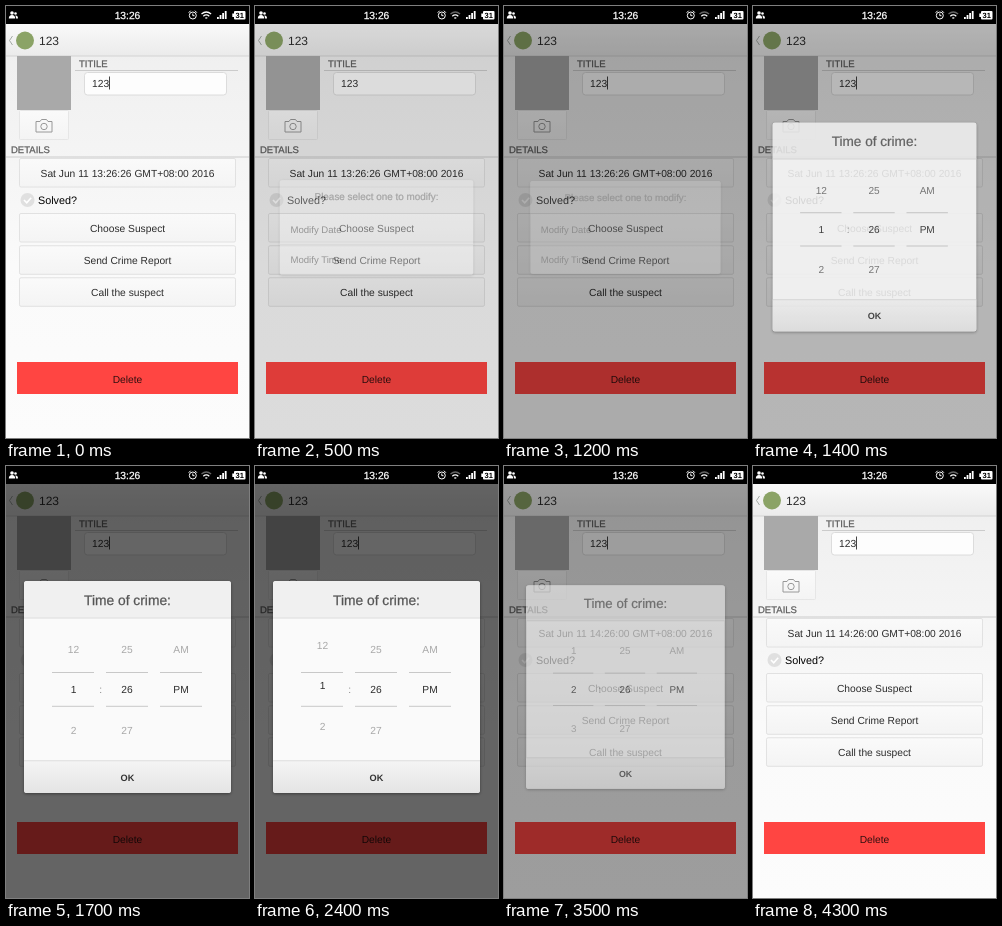
Write an HTML page that moves like this. It is 243x432 px and loops after 4500 ms.

```html
<!DOCTYPE html>
<html lang="en">
<head>
<meta charset="utf-8">
<title>Crime details</title>
<style>
  html, body { margin: 0; width: 100%; height: 100%; overflow: hidden; background: #f9f9f9; }
  svg { display: block; width: 100vw; height: 100vh; }
  text { font-family: "Liberation Sans", Arial, sans-serif; font-size: 10.25px; white-space: pre; text-rendering: geometricPrecision; }
  .mid { text-anchor: middle; }
  .medium { stroke: currentColor; stroke-width: .25px; }
  .section { font-size: 9.5px; fill: #5c5c5c; color: #5c5c5c; }
  #menu { transform-origin: 121.5px 221.5px; }
  #picker { transform-origin: 121.5px 221px; }
</style>
</head>
<body>
<svg viewBox="0 0 243 432" preserveAspectRatio="none">
  <defs>
    <linearGradient id="page" x2="0" y2="1"><stop stop-color="#ededed"/><stop offset=".6" stop-color="#fafafa"/><stop offset="1" stop-color="#fcfcfc"/></linearGradient>
    <linearGradient id="bar" x2="0" y2="1"><stop stop-color="#f9f9f9"/><stop offset="1" stop-color="#ebebeb"/></linearGradient>
    <linearGradient id="button" x2="0" y2="1"><stop stop-color="#fafafa"/><stop offset="1" stop-color="#f4f4f4"/></linearGradient>
    <linearGradient id="foot" x2="0" y2="1"><stop stop-color="#f4f4f4"/><stop offset="1" stop-color="#e4e4e4"/></linearGradient>
    <filter id="shadow" x="-10%" y="-10%" width="120%" height="125%"><feDropShadow dx="0" dy="1" stdDeviation="1.5" flood-opacity=".4"/></filter>
    <clipPath id="menuBox"><rect x="18" y="171" width="207" height="101" rx="3"/></clipPath>
    <clipPath id="pickerBox"><rect x="18" y="115" width="207" height="212" rx="3"/></clipPath>
    <clipPath id="centre"><rect x="40" y="207" width="165" height="33"/></clipPath>
    <clipPath id="sides"><path d="M40 162h165v45H40zM40 240h165v44H40z"/></clipPath>
  </defs>

  <rect width="243" height="432" fill="url(#page)"/>

  <!-- app bar -->
  <rect y="18" width="243" height="32" fill="url(#bar)"/>
  <path d="M0 50H243" stroke="#cccccc" stroke-width=".8"/>
  <path d="M6.5 30L3.5 34.5L6.5 39" fill="none" stroke="#a3aaa5"/>
  <circle cx="19" cy="34.5" r="9" fill="#8ba366"/>
  <text x="33" y="38.7" style="font-size:12px" fill="#2c2c2c">123</text>

  <!-- photo and title -->
  <rect x="11" y="50" width="54" height="54" fill="#a9a9a9"/>
  <rect x="13.5" y="104.5" width="49" height="29" rx="1" fill="url(#button)" stroke="#e2e2e2" stroke-width=".8"/>
  <g fill="none" stroke="#989898">
    <path d="M30 115.500h4l1.500-2h5l1.500 2h4v10.500h-16z"/>
    <circle cx="38" cy="120.500" r="3.200"/>
  </g>
  <text class="section medium" x="73" y="60.600">TITILE</text>
  <path d="M69 64.500H232M0 151H243" stroke="#cbcbcb"/>
  <rect x="78.500" y="66.500" width="142" height="22.500" rx="3" fill="#fdfdfd" stroke="#d8d8d8" stroke-width=".9"/>
  <text x="86" y="81" fill="#2c2c2c">123</text>
  <path id="cursor" d="M103.500 70.500V83.500" stroke="#444"/>
  <text class="section medium" x="5" y="147">DETAILS</text>

  <g id="buttons"></g>
  <circle cx="21.500" cy="194" r="7" fill="#e0e0e0"/>
  <path d="M18 194l2.700 2.800l4.500-5" fill="none" stroke="#fff" stroke-width="1.600"/>
  <text x="32" y="198" style="font-size:10.800px">Solved?</text>
  <rect x="11" y="356" width="221" height="32" fill="#ff4542"/>
  <text class="mid" x="121.500" y="376.500" fill="#321010">Delete</text>

  <rect id="dim" y="18" width="243" height="414" opacity="0"/>

  <g id="menu" opacity="0">
    <g filter="url(#shadow)"><g clip-path="url(#menuBox)">
      <rect x="18" y="171" width="207" height="101" fill="#fcfcfc"/>
      <rect x="18" y="171" width="207" height="35.500" fill="#f0f0f0"/>
      <rect id="row" x="18" y="240" width="207" height="32" fill="#dedede" opacity="0"/>
      <path d="M18 206.500H225M18 239.500H225" stroke="#dadada"/>
    </g></g>
    <text class="mid medium" x="121.500" y="192.500" style="font-size:10.600px" fill="#555" color="#555">Please select one to modify:</text>
    <text x="29.500" y="227.200" fill="#2c2c2c">Modify Date</text>
    <text x="29.500" y="260" fill="#2c2c2c">Modify Time</text>
  </g>

  <g id="picker" opacity="0">
    <g filter="url(#shadow)"><g clip-path="url(#pickerBox)">
      <rect x="18" y="115" width="207" height="212" fill="#fafafa"/>
      <rect x="18" y="115" width="207" height="37" fill="#f0f0f0"/>
      <rect x="18" y="295" width="207" height="32" fill="url(#foot)"/>
      <rect id="ok" x="18" y="295" width="207" height="32" fill="#d2d2d2" opacity="0"/>
      <path d="M18 152H225M18 294.800H225" stroke="#dcdcdc"/>
    </g></g>
    <text class="mid medium" x="121.500" y="138.700" style="font-size:13.800px" fill="#555" color="#555">Time of crime:</text>
    <path d="M46 206.500h42m12 0h42m12 0h42M46 240.300h42m12 0h42m12 0h42" stroke="#c8c8c8"/>
    <text class="mid" x="94.800" y="227" fill="#888">:</text>
    <g id="wheels"></g>
    <text class="mid" x="121.500" y="314.500" style="font-size:9.200px;font-weight:bold" fill="#333">OK</text>
  </g>

  <!-- status bar -->
  <rect width="243" height="18"/>
  <g fill="#fff" color="#fff">
    <circle cx="6" cy="7" r="1.800"/><path d="M2.800 12.500q0-3.500 3.200-3.500t3.200 3.500z"/>
    <circle cx="9.500" cy="7.500" r="1.300"/><path d="M10 12.500q0-2-.8-3q2.800-.3 2.800 3z"/>
    <text class="mid medium" x="121.500" y="12.800">13:26</text>
    <path d="M211 13v-2h1.800v2zM213.600 13v-4h1.800v4zM216.200 13v-6h1.800v6zM218.800 13v-8h1.800v8z"/>
    <rect x="228" y="5" width="11.500" height="8.500" rx="1"/><rect x="226.300" y="7.500" width="1.700" height="3.500"/>
  </g>
  <text class="mid" x="233.700" y="12" style="font-size:7.500px;font-weight:bold">31</text>
  <g fill="none" stroke="#fff">
    <circle cx="186.800" cy="9.500" r="3.500"/>
    <path d="M186.800 7.500v2.200h1.700M182.700 6.700l2-2M190.900 6.700l-2-2"/>
    <path d="M197.300 10.200q3-2.500 6 0M199.300 12.300q1-.8 2 0" stroke-width="1.300"/>
    <path id="wifi" d="M195.500 8q4.800-4 9.600 0" stroke-width="1.300"/>
  </g>
</svg>

<script>
const LOOP = 4500;
const $ = id => document.getElementById(id);
const tracks = [];

// Each track holds [time, value] pairs, shown as hard steps.
const steps = (id, prop, table) => tracks.push({ style: $(id).style, prop, table });

const label = (x, y, text, extra = '') =>
  `<text class="mid" x="${x}" y="${y}" ${extra}>${text}</text>`;

const button = (y, text) =>
  `<rect x="13.5" y="${y}" width="216" height="28.5" rx="1.5" fill="url(#button)" stroke="#dfdfdf" stroke-width=".9"/>` +
  (text ? label(121.5, y + 18, text, 'fill="#2c2c2c"') : '');

const date = clock => `Sat Jun 11 ${clock} GMT+08:00 2016`;

$('buttons').innerHTML = button(152.5) +
  '<rect id="press" x="14" y="153" width="215" height="27.5" fill="#dcdcdc" opacity="0"/>' +
  label(121.5, 171, date('13:26:26'), 'id="before" fill="#2c2c2c"') +
  label(121.5, 171, date('14:26:00'), 'id="after" fill="#2c2c2c" opacity="0"') +
  button(207.5, 'Choose Suspect') + button(239.8, 'Send Crime Report') + button(271.8, 'Call the suspect');

const GAP = 40.3;
const column = (x, items) =>
  items.map((text, i) => label(x, 187 + i * GAP, text)).join('');

const wheel = (name, fill) =>
  `<g id="${name}Wheel" clip-path="url(#${name})" fill="${fill}">
    <g id="${name}Hours">${column(67.5, [12, 1, 2, 3])}</g>
    ${column(121, [25, 26, 27])}${column(175, ['AM', 'PM'])}</g>`;

$('wheels').innerHTML = wheel('sides', '#a8a8a8') + wheel('centre', '#2c2c2c');

steps('wifi', 'opacity', [[0, 1], [300, .4]]);
steps('cursor', 'opacity', [[0, 1], [500, 0], [1200, 1], [3900, 0], [4300, 1]]);
steps('press', 'opacity', [[0, 0], [200, 1], [400, 0]]);
steps('row', 'opacity', [[0, 0], [900, 1], [1100, 0]]);
steps('ok', 'opacity', [[0, 0], [3400, 1], [3500, 0]]);
steps('before', 'opacity', [[0, 1], [3500, 0]]);
steps('after', 'opacity', [[0, 0], [3500, 1]]);

steps('dim', 'opacity', [
  [0, 0], [500, .13], [600, .42], [700, .6],
  [1100, .48], [1200, .32], [1300, .2], [1400, .28], [1500, .45], [1600, .6],
  [3500, .38], [3600, .17], [3700, .05], [3800, 0]
]);
steps('menu', 'opacity', [[0, 0], [500, .38], [600, .95], [700, 1], [1100, .7], [1200, .2], [1300, 0]]);
steps('menu', 'transform', [
  [0, 'scale(.9)'], [500, 'scale(.935)'], [600, 'scale(.99)'], [700, 'scale(1)'],
  [1100, 'scale(.97)'], [1200, 'scale(.92)']
]);
steps('picker', 'opacity', [[0, 0], [1300, .4], [1400, .85], [1500, 1], [3500, .6], [3600, .15], [3700, 0]]);
steps('picker', 'transform', [
  [0, 'scale(.9)'], [1300, 'scale(.93)'], [1400, 'scale(.985)'], [1500, 'scale(1)'],
  [3500, 'scale(.96)'], [3600, 'scale(.92)']
]);
steps('sidesWheel', 'fill', [[0, '#6c6c6c'], [1500, '#8c8c8c'], [1600, '#a8a8a8']]);

// The hour is dragged, then settles one place further.
const scroll = [[0, 0], [2400, 3.8], [2500, 11], [2600, 20], [2700, 28], [2800, 34], [2900, 38], [3000, GAP]]
  .map(([time, y]) => [time, `translateY(${-y}px)`]);
for (const name of ['sides', 'centre']) steps(name + 'Hours', 'transform', scroll);

function draw() {
  const now = performance.now() % LOOP;
  for (const { style, prop, table } of tracks) {
    style[prop] = table.findLast(([time]) => time <= now)[1];
  }
  requestAnimationFrame(draw);
}
draw();
</script>
</body>
</html>
```
